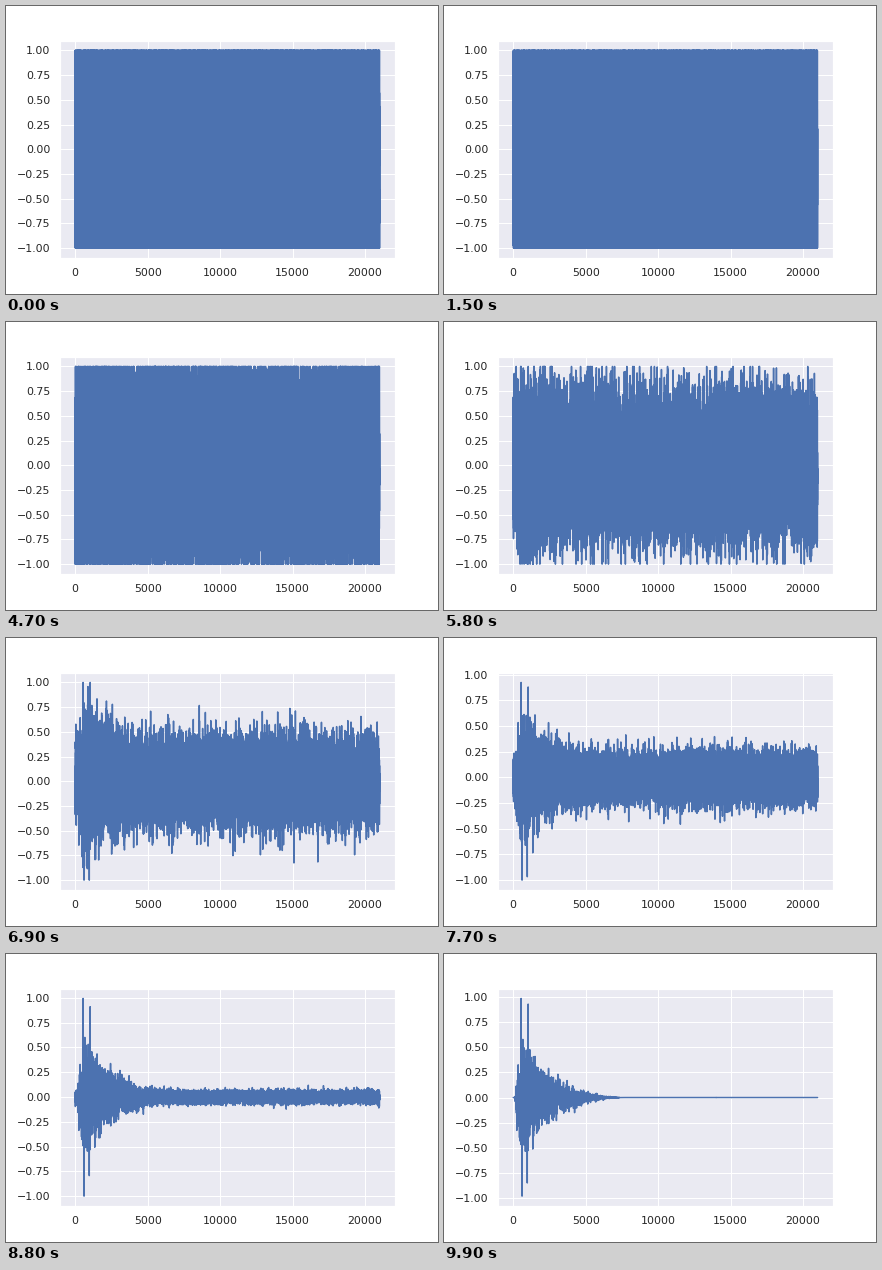
Write a matplotlib script that moves like this. It is 432 by 288 pixels and loops after 10000 ms.

```python
import numpy as np
import matplotlib.pyplot as plt
from matplotlib.animation import FuncAnimation

FRAMES = 100
N = 21000
INK = ".15"

plt.rc("font", family="DejaVu Sans", size=12)
plt.rc("axes", facecolor="#EAEAF2", edgecolor="white", linewidth=1.25,
       grid=True, axisbelow=True)
plt.rc("grid", color="white", linewidth=1, linestyle="-")
plt.rc("xtick", color=INK, labelsize=11, bottom=False)
plt.rc("ytick", color=INK, labelsize=11, left=False)
plt.rc(("xtick.major", "ytick.major"), size=6)
plt.rc("lines", linewidth=1.5, solid_capstyle="round")
plt.rc("agg.path", chunksize=10000)


def make_hit(rng):
    """A drum-like burst: fast attack, exponential decay, four loud peaks."""
    t = np.arange(N)
    attack = np.clip((t - 90) / 330, 0, 1) ** 1.3
    release = np.clip((7500 - t) / 3500, 0, 1)
    body = .7 * attack * np.exp(-t / 2400) * release

    carrier = np.convolve(rng.standard_normal(N), np.hanning(13), "same")
    wave = body * np.clip(carrier / (2.4 * carrier.std()), -1.4, 1.4)
    for pos, level in (545, .986), (610, -.981), (970, -.85), (1030, .93):
        w = np.clip(1 - np.abs(t - pos) / 6, 0, 1)
        wave += w * (level - wave)
    return wave


def make_steps():
    """Noisy waveforms, each step keeping part of the previous noise."""
    rng = np.random.default_rng(7)
    hit = make_hit(rng)
    left = np.linspace(1, 0, FRAMES)
    sigma = 1 - np.exp(-2.5 * left ** 2)
    noise = rng.standard_normal(N)
    steps = np.empty((FRAMES, N), np.float32)
    for i, s in enumerate(sigma):
        if i:
            keep = s / sigma[i - 1]
            noise = keep * noise + np.sqrt(1 - keep ** 2) * rng.standard_normal(N)
        steps[i] = np.clip(hit + s * noise, -1, 1)
    return steps


steps = make_steps()

fig, ax = plt.subplots(figsize=(6, 4), dpi=72, facecolor="white")
fig.subplots_adjust(left=.125, right=.9, bottom=.125, top=.88)
line, = ax.plot(np.arange(N), steps[0], color="#4C72B0")
ax.set_xlim(-.05 * (N - 1), 1.05 * (N - 1))


def draw(i):
    wave = steps[i]
    lo, hi = float(wave.min()), float(wave.max())
    pad = .05 * (hi - lo)
    line.set_ydata(wave)
    ax.set_ylim(lo - pad, hi + pad)
    return line,


anim = FuncAnimation(fig, draw, frames=FRAMES, interval=100,
                     repeat=True, repeat_delay=0)
plt.show()
```
